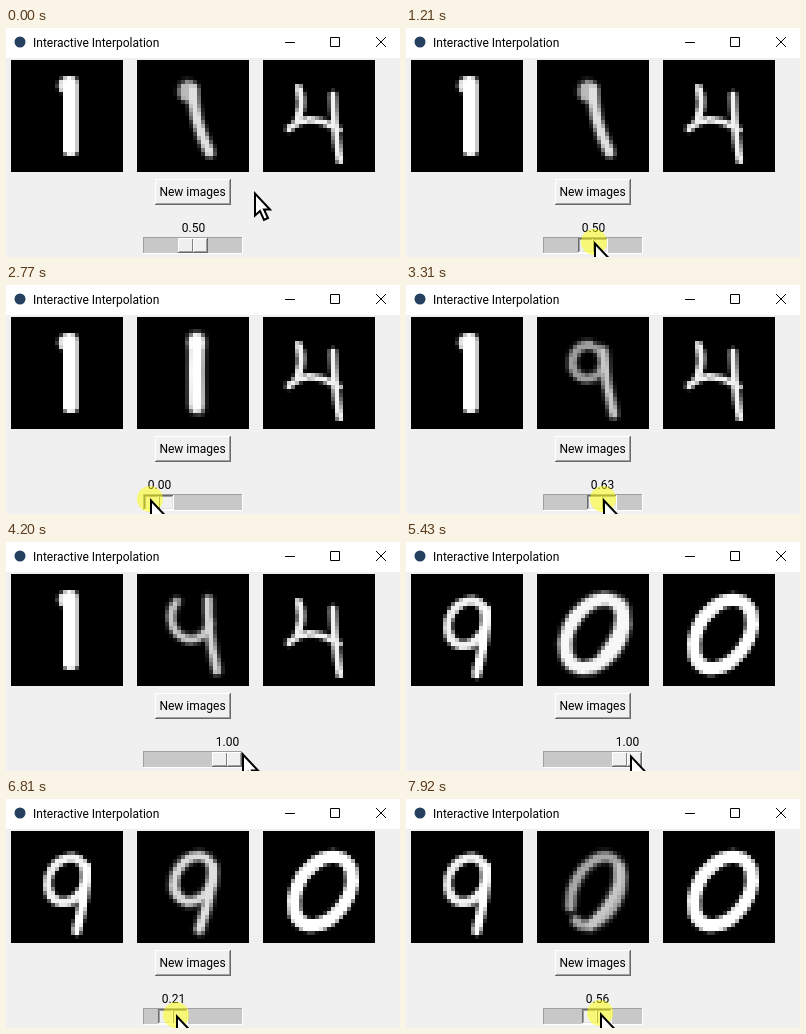
These frames come from a looping animation (394 by 229 pixels, 7990 ms). An HTML page with a canvas:

```html
<!DOCTYPE html>
<html lang="en">
<head>
<meta charset="utf-8">
<title>Interactive Interpolation</title>
<style>
  html, body { margin: 0; width: 100%; height: 100%; overflow: hidden; background: #f0f0f0; }
  canvas { display: block; }
</style>
</head>
<body>
<canvas id="stage" width="394" height="229"></canvas>
<script>
const LOOP = 7990, NEW_IMAGES = 4880;
const ctx = document.getElementById('stage').getContext('2d');
const tile = document.createElement('canvas');
tile.width = tile.height = 28;
const pen = tile.getContext('2d');

// A digit on a 28 x 28 grid is an elliptical arc plus quadratic curves.
// arc: cx, cy, rx, ry, tilt, from, to; curve: start, control, end; tone: arc, curves
const glyph = (width, tone, arc, ...curves) => ({ width, tone, arc, curves });
const FULL = [-4.2, 2.08], TOP = [-1.6, 4.68];

const one = glyph(3.8, [.9, 1], [13.9, 6.3, .3, .3, 0, ...FULL], [14.9, 5.8, 14.9, 14, 14.9, 22.2]);
const four = glyph(1.8, [0, .95], [9, 7, .1, .1, 0, ...FULL],
  [8.9, 6.9, 10.5, 11, 8.5, 15.5], [6.5, 17.2, 11, 12.5, 19, 17.4], [17.5, 8.7, 17.6, 15, 19.2, 25.2]);
const nine = glyph(2.3, [.95, 1], [14, 12.2, 4.5, 5.9, .45, ...FULL], [18.8, 9, 19, 15, 16.4, 25]);
const zero = glyph(3.3, [1, 1], [15, 15, 6.3, 9.4, .58, ...FULL]);

// Morph stops: slider value and digit.
const oneToFour = [
  [0, glyph(3.7, [.9, 1], [14.8, 6.5, .3, .3, 0, ...TOP], [14.9, 5.7, 14.7, 14, 14.9, 22.3])],
  [.28, glyph(2.9, [.5, .88], [13.5, 7, .3, .3, 0, ...TOP], [13.5, 6.1, 14.3, 15, 16.2, 22.8])],
  [.5, glyph(2.5, [.72, .88], [12.8, 7.8, 1.2, 1.5, 0, ...TOP], [14, 7.3, 14, 15, 18.1, 23])],
  [.63, glyph(2.1, [.62, .78], [12.7, 11.2, 3.9, 4.2, .2, ...TOP], [16.6, 8.5, 16.8, 16, 19.2, 24.3])],
  [1, glyph(2, [.78, .84], [13.5, 10.8, 5, 5.5, 0, .3, 3.9], [17.8, 6.4, 17.5, 14, 20, 24.2])]];
const nineToZero = [
  [0, glyph(2.3, [.9, .92], [14, 12.2, 4.5, 5.9, .45, ...FULL], [18.8, 9, 19, 15, 16, 25])],
  [.21, glyph(2.3, [.86, .88], [14.2, 12, 4.6, 6, .5, ...FULL], [19, 9, 19, 15, 15.6, 24.6])],
  [.56, glyph(2.4, [.66, .78], [14.8, 15, 5.7, 9.1, .45, -3.9, 1.8], [20.5, 9, 21.5, 16, 13.5, 23.5])],
  [1, glyph(3.2, [.97, .97], [14.4, 14.9, 6.3, 9.4, .58, ...FULL], [21, 8, 22.5, 14, 17, 20.5])]];

// Pointer key points: time, x, y.
const pointerPath = [
  [0, 248, 164], [340, 192, 170], [870, 192, 170], [1210, 188, 214], [1410, 188, 214],
  [1950, 173, 214], [2500, 137, 214], [2700, 137, 214], [3310, 197, 214], [4000, 236, 212],
  [4340, 236, 210], [4690, 197, 167], [5150, 197, 167], [5430, 224, 213], [5570, 224, 214],
  [6810, 170, 216], [7300, 147, 215], [7600, 152, 215], [7920, 194, 214], [LOOP, 203, 214]];

const within = (t, from, to) => t >= from && t < to;

function mix(a, b, k) {
  if (typeof a === 'number') return a + (b - a) * k;
  if (Array.isArray(a)) return a.map((item, i) => mix(item, b[i], k));
  return Object.fromEntries(Object.keys(a).map(key => [key, mix(a[key], b[key], k)]));
}

// Interpolates a list whose entries start with their position.
function sample(stops, pos) {
  const i = Math.max(1, stops.findIndex(stop => stop[0] >= pos));
  const [a, b] = [stops[i - 1], stops[i]];
  return mix(a, b, (pos - a[0]) / (b[0] - a[0])).slice(1);
}

function valueAt(t, x) {
  if (t < 1300) return .5;
  if (within(t, 4140, 5460)) return 1;
  const grip = t < 4140 ? 1 : 3;
  return Math.round(Math.min(1, Math.max(0, (x - grip - 153) / 68)) * 100) / 100;
}

function strokeGlyph({ width, tone, arc, curves }, grow, gain) {
  const grey = level => `rgb(${Array(3).fill(255 * level * gain)})`;
  pen.lineWidth = width + grow;
  pen.strokeStyle = grey(tone[0]);
  pen.beginPath();
  pen.ellipse(...arc);
  pen.stroke();
  pen.strokeStyle = grey(tone[1]);
  pen.beginPath();
  for (const [x, y, ...rest] of curves) {
    pen.moveTo(x, y);
    pen.quadraticCurveTo(...rest);
  }
  pen.stroke();
}

function drawDigit(digit, x, soft) {
  pen.globalCompositeOperation = 'source-over';
  pen.fillRect(0, 0, 28, 28);
  pen.globalCompositeOperation = 'lighten';
  pen.lineCap = 'round';
  if (soft) strokeGlyph(digit, 1.3, .28);
  strokeGlyph(digit, soft ? -.2 : 0, 1);
  ctx.imageSmoothingEnabled = false;
  ctx.drawImage(tile, x, 32, 112, 112);
}

function box(x, y, w, h, color) {
  ctx.fillStyle = color;
  ctx.fillRect(x, y, w, h);
}

function disc(x, y, r, color) {
  ctx.fillStyle = color;
  ctx.beginPath();
  ctx.arc(x, y, r, 0, 7);
  ctx.fill();
}

function bevel(x, y, w, h, sunken) {
  box(x, y, w, h, sunken ? '#fff' : '#696969');
  box(x, y, w - 1, h - 1, sunken ? '#696969' : '#fff');
  box(x + 1, y + 1, w - 2, h - 2, sunken ? '#e3e3e3' : '#a0a0a0');
  box(x + 1, y + 1, w - 3, h - 3, sunken ? '#a0a0a0' : '#f0f0f0');
  if (sunken) box(x + 2, y + 2, w - 4, h - 4, '#f0f0f0');
}

function text(str, x, y, align = 'center') {
  ctx.font = '12px Roboto, sans-serif';
  ctx.textAlign = align;
  ctx.fillStyle = '#000';
  ctx.fillText(str, x, y);
}

function drawWindow() {
  box(0, 0, 394, 229, '#f0f0f0');
  box(0, 0, 394, 30, '#fff');
  disc(14, 14, 5.5, '#24405e');
  text('Interactive Interpolation', 27, 19, 'left');
  ctx.strokeStyle = '#000';
  ctx.lineWidth = 1;
  ctx.stroke(new Path2D('M279 14.5h10M324.5 9.5h9v9h-9zM370 9l10 10M380 9l-10 10'));
}

function drawButton(down) {
  bevel(149, 151, 76, 26, down);
  text('New images', 186.5 + down, 168 + down);
}

function drawSlider(v, held) {
  const x = Math.round(138 + 68 * v);
  text(v.toFixed(2), x + 15.5, 204);
  box(137, 209, 100, 17, '#fff');
  box(137, 209, 99, 16, '#a0a0a0');
  box(138, 210, 98, 15, '#c8c8c8');
  bevel(x, 210, 30, 15, held);
  box(x + 14, 211, 1, 13, held ? '#fff' : '#808080');
  box(x + 15, 211, 1, 13, held ? '#808080' : '#fff');
}

function drawPointer(x, y, pressed) {
  if (pressed) disc(x, y, 13, 'rgba(255,255,0,.5)');
  ctx.save();
  ctx.translate(Math.round(x), Math.round(y));
  const arrow = new Path2D('M1 1.5V23.5L6 19 10 28 14 26 10 17.5H16z');
  ctx.fillStyle = '#fff';
  ctx.fill(arrow);
  ctx.strokeStyle = '#000';
  ctx.lineWidth = 2;
  ctx.stroke(arrow);
  ctx.restore();
}

function draw(t) {
  const [x, y] = sample(pointerPath, t);
  const value = valueAt(t, x);
  const clicking = within(t, 4600, NEW_IMAGES);
  const dragging = within(t, 1200, 4140) || t >= 5460;
  const [left, stops, right] = t < NEW_IMAGES ? [one, oneToFour, four] : [nine, nineToZero, zero];
  drawWindow();
  drawDigit(left, 5);
  drawDigit(sample(stops, value)[0], 131, true);
  drawDigit(right, 257);
  drawButton(clicking);
  drawSlider(value, dragging);
  drawPointer(x, y, clicking || dragging);
}

const start = performance.now();
function tick(now) {
  draw(Math.max(0, now - start) % LOOP);
  requestAnimationFrame(tick);
}
requestAnimationFrame(tick);
</script>
</body>
</html>
```
